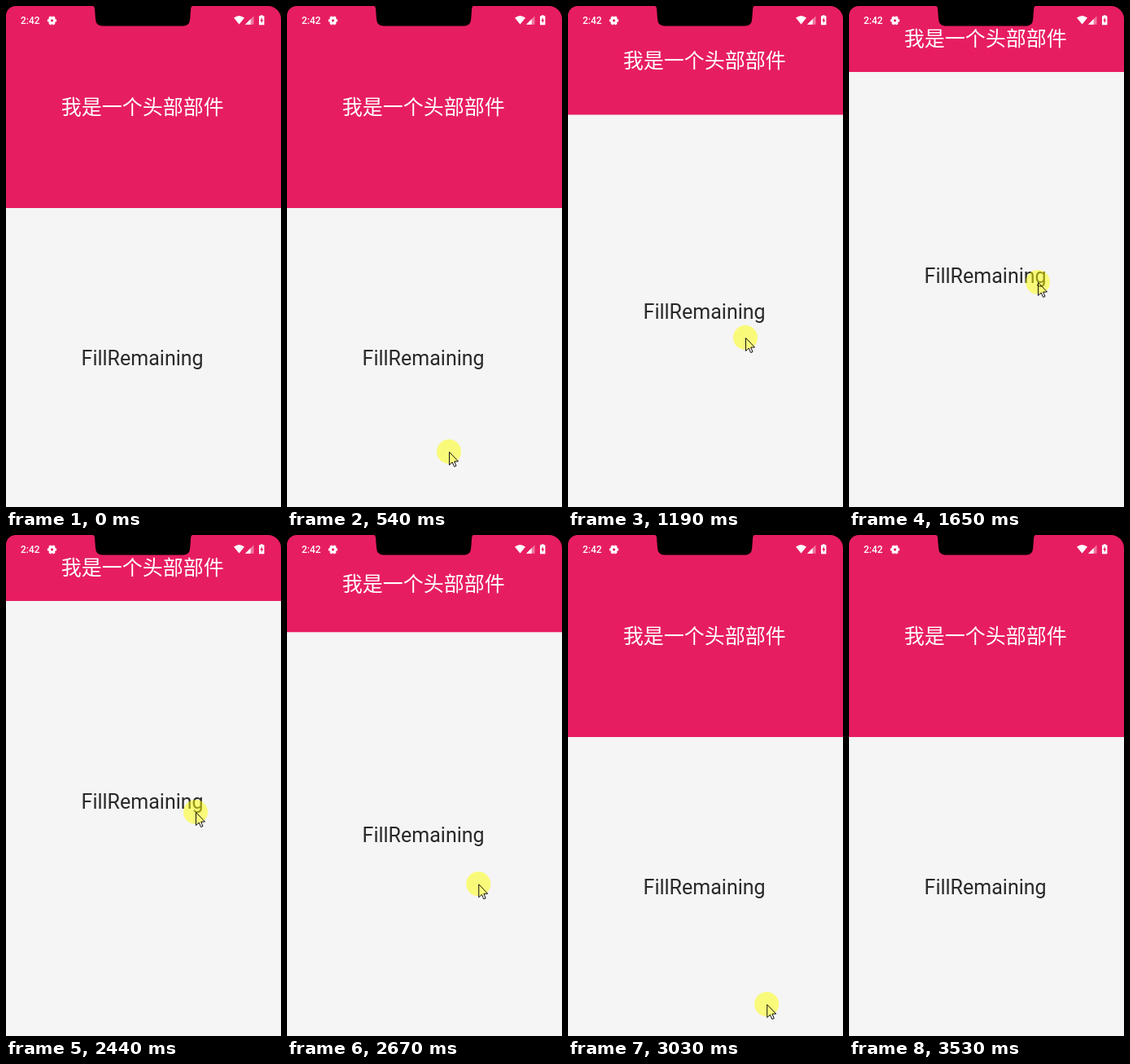
Animation of 338x615 px, one loop 4140 ms. Source, as an HTML page:

```html
<!DOCTYPE html>
<html lang="zh">
<head>
<meta charset="utf-8">
<title>Collapsing header</title>
<style>
  html, body { margin: 0; width: 100%; height: 100%; overflow: hidden; background: #f5f5f5; }
  svg { display: block; width: 338px; height: 615px; }
  text { font: 400 25px Roboto, sans-serif; fill: #fff; }
  #title { font-family: "Noto Sans CJK SC", "Noto Sans CJK", sans-serif; text-anchor: middle; }
  #label { fill: #2a2828; text-anchor: middle; }
  #clock { font-size: 11.9px; font-weight: 500; }
</style>
</head>
<body>
<svg viewBox="0 0 338 615">
  <rect width="338" height="615" fill="#f5f5f5"/>
  <text id="label" x="167.6">FillRemaining</text>
  <rect id="header" width="338" fill="#e71d62"/>
  <text id="title" x="167.7">我是一个头部部件</text>

  <!-- status bar -->
  <text id="clock" x="18" y="22">2:42</text>
  <g transform="translate(56.5 17.8)" fill="none" stroke="#fff">
    <circle r="3.1" stroke-width="3"/>
    <circle r="4.8" stroke-width="1.8" pathLength="12" stroke-dasharray="1.200 .8" stroke-dashoffset=".6"/>
  </g>
  <g fill="#fff">
    <path d="M280 14.6Q286.5 9.6 293 14.6L286.5 22.6Z"/>
    <path d="M294 22.8L304.5 12.3V22.8Z" opacity=".4"/>
    <path d="M294 22.8L300.7 16.1V22.8Z"/>
    <path d="M312.8 12.2V11.2H315.6V12.2H317.4V23.2H311V12.2Z"/>
  </g>
  <path d="M314.8 13.8L312.3 18.2H313.8V21.6L316.2 17.1H314.8Z" fill="#e71d62"/>

  <!-- screen cut-outs -->
  <path d="M107 0Q108.7 .3 109 3L110 16Q110.6 24.4 118 24.4H218.500Q225.600 24.4 226.200 16L227.200 3Q227.500 .3 229 0Z"/>
  <path d="M0 0H12A12 12 0 0 0 0 12ZM338 0H322A16 16 0 0 1 338 16Z"/>

  <g id="pointer">
    <circle id="press" r="15" fill="#ff0" fill-opacity=".5"/>
    <path d="M.5 .5V16.500L4.200 13L6.600 18.500L9 17.500L6.700 12H11.500Z" fill="none" stroke="#111"/>
  </g>
</svg>
<script>
  const LOOP = 4140, STEP = 45;
  const TALL = 248, SHORT = 81, MAX_SCROLL = 189;
  const SLOP = 21, LAG = 18;   // finger travel before scrolling, and delay behind it
  const ENTER = 80, PRESS = 540, UP = 770, RELEASE = 2210, DOWN = 2440, LET_GO = 3160, LEAVE = 3480;

  // time, x, y
  const upStroke = [[UP, 199, 547], [950, 205, 463], [1175, 218, 407], [1265, 222, 386],
    [1625, 232, 339], [1890, 232, 336]];
  const downStroke = [[DOWN, 233, 340], [2845, 237, 499], [2890, 239, 564], [LEAVE, 262, 616]];

  const [label, header, title, pointer, press] =
    ["label", "header", "title", "pointer", "press"].map(id => document.getElementById(id));

  const clamp = (v, lo, hi) => Math.min(hi, Math.max(lo, v));
  const within = (t, from, to) => t >= from && t < to;
  const snap = (t, from) => from + Math.floor((t - from) / STEP) * STEP;
  const show = (el, on) => el.setAttribute("visibility", on ? "visible" : "hidden");

  function along(stroke, t) {
    const n = clamp(stroke.findLastIndex(k => k[0] <= t), 0, stroke.length - 2);
    const [t0, x0, y0] = stroke[n], [t1, x1, y1] = stroke[n + 1];
    const u = clamp((t - t0) / (t1 - t0), 0, 1);
    return [x0 + (x1 - x0) * u, y0 + (y1 - y0) * u];
  }

  // curved approach to the point where the first drag starts
  function approach(t) {
    const u = clamp((t - ENTER) / (6 * STEP), 0, 1);
    const curve = (a, b, c) => a * (1 - u) ** 2 + 2 * b * u * (1 - u) + c * u * u;
    return [curve(284, 282, 199), curve(590, 508, 547)];
  }

  function pointerAt(t) {
    if (t < UP) return approach(snap(t, ENTER));
    return t < DOWN ? along(upStroke, snap(t, UP)) : along(downStroke, snap(t, DOWN));
  }

  function scrollAt(t) {
    const dragging = t < DOWN ? upStroke : downStroke;
    const grabY = dragging[0][2];
    const y = along(dragging, snap(t, dragging[0][0]) - LAG)[1];
    const travel = Math.max(0, Math.abs(y - grabY) - SLOP);
    return clamp(t < DOWN ? travel : MAX_SCROLL - travel, 0, MAX_SCROLL);
  }

  function draw(t) {
    const scroll = scrollAt(t);
    const height = Math.max(SHORT, TALL - scroll);
    const extra = Math.max(0, scroll - (TALL - SHORT));

    header.setAttribute("height", height);
    title.setAttribute("y", height / 2 + 8.9);
    label.setAttribute("y", 441.3 - (TALL - height) / 2 - extra);
    pointer.setAttribute("transform", `translate(${pointerAt(t)})`);

    const visible = within(t, ENTER, LEAVE);
    show(pointer, visible);
    show(press, visible && (within(t, PRESS, RELEASE) || within(t, DOWN, LET_GO)));
  }

  const start = performance.now();
  function loop() {
    draw((performance.now() - start) % LOOP);
    requestAnimationFrame(loop);
  }
  loop();
</script>
</body>
</html>
```
